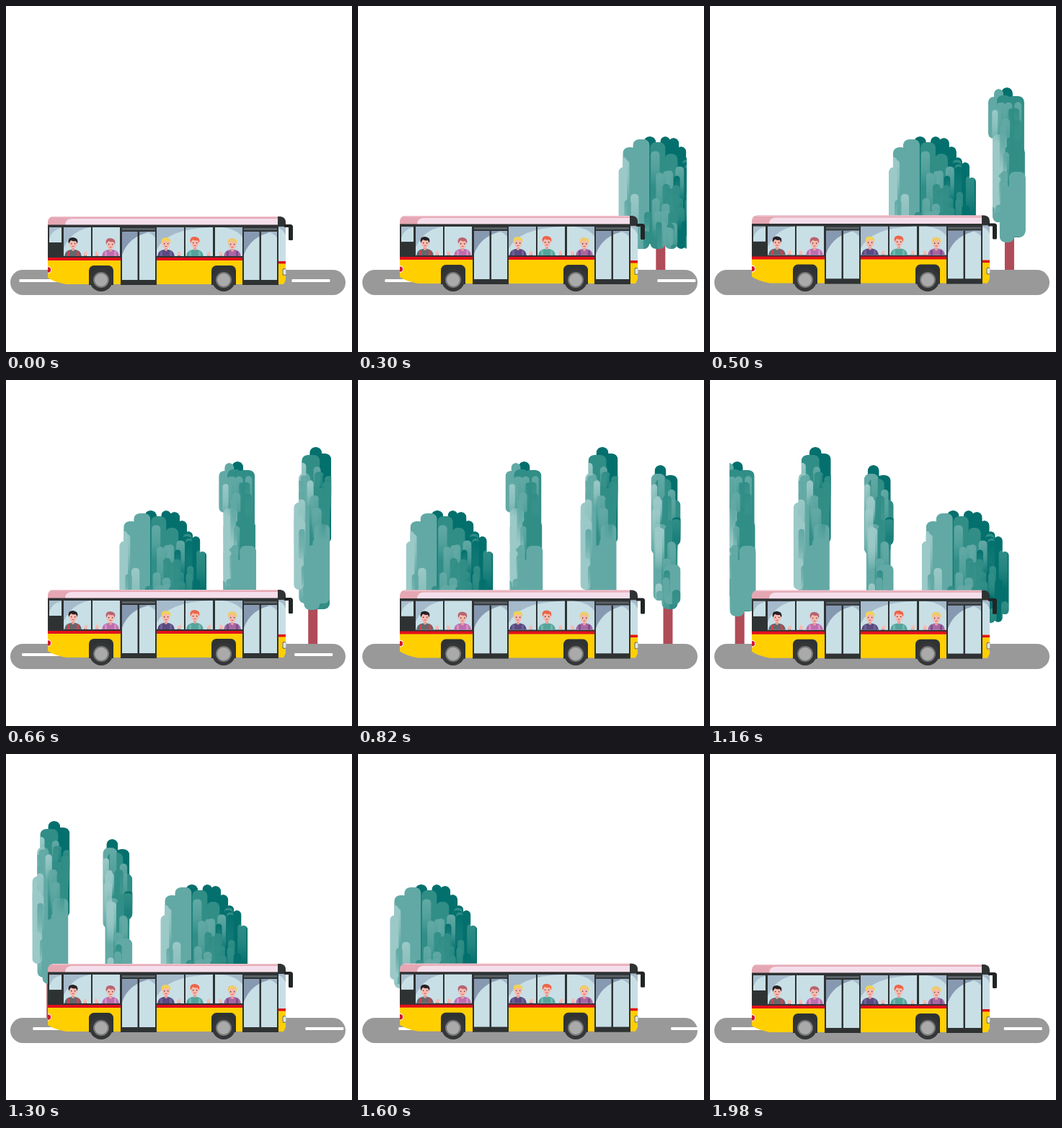
An HTML page with a canvas for the animation above (2000 ms loop, 480 px wide and 480 px high).

```html
<!DOCTYPE html>
<html lang="en">
<head>
<meta charset="utf-8">
<title>Bus ride</title>
<style>
html, body { margin: 0; width: 100%; height: 100%; overflow: hidden; background: #fff; }
canvas { display: block; }
</style>
</head>
<body>
<canvas id="stage" width="480" height="480"></canvas>
<script>
const g = document.getElementById('stage').getContext('2d');
const LOOP = 2000, SPEED = 0.567, DASH_GAP = 189;
const DARK = '#2f3233', YELLOW = '#ffcf00', RED = '#e3101c', SKIN = '#f8b9ad';
const SHADES = ['#9bc9c7', '#62a9a5', '#318e87', '#03706d'];

function box(x, y, w, h, color, r = 0) {
  g.fillStyle = color;
  g.beginPath();
  g.roundRect(x, y, w, h, r);
  g.fill();
}
function disc(x, y, r, color, ry = r) {
  g.fillStyle = color;
  g.beginPath();
  g.ellipse(x, y, r, ry, 0, 0, 7);
  g.fill();
}
function shape(d, color) {
  g.fillStyle = color;
  g.fill(new Path2D(d));
}
function within(path, draw) {
  g.save();
  g.clip(path);
  draw();
  g.restore();
}
function rectPath(x, y, w, h, r = 0) {
  const p = new Path2D();
  p.roundRect(x, y, w, h, r);
  return p;
}
function random(seed) {
  return () => (seed = seed * 16807 % 2147483647) / 2147483647;
}

// Crown columns: x, top, width, bottom, shade
const BUSH = [
  [35, 181, 17, 330, 3], [58, 181, 14, 330, 3], [69, 183, 15, 335, 3],
  [80, 195, 14, 337, 3], [90, 210, 12, 337, 3], [100, 217, 12, 336, 3],
  [110, 238, 11, 325, 3], [20, 185, 23, 337, 1], [6, 196, 20, 325, 1],
  [0, 224, 12, 313, 0], [44, 189, 21, 337, 2], [64, 205, 18, 337, 2]
];
const POPLAR = [
  [18, 113, 16, 200, 3], [26, 125, 24, 235, 2], [8, 115, 13, 200, 1],
  [0, 126, 14, 184, 1], [12, 124, 20, 300, 2], [6, 178, 20, 300, 0],
  [26, 195, 25, 321, 2], [29, 230, 23, 320, 1], [16, 250, 20, 328, 1]
];
const TALL = [
  [22, 93, 17, 180, 3], [26, 102, 26, 227, 3], [11, 104, 25, 300, 2],
  [7, 129, 16, 310, 1], [0, 170, 14, 291, 0], [22, 150, 28, 318, 2],
  [28, 200, 22, 310, 1], [14, 230, 22, 319, 1]
];
const SLIM = [
  [5, 118, 16, 190, 3], [17, 132, 20, 240, 3], [0, 130, 20, 242, 1],
  [6, 137, 22, 300, 2], [18, 166, 23, 230, 2], [3, 200, 20, 306, 1],
  [15, 210, 22, 318, 2], [18, 256, 23, 311, 1]
];

function makeTree(x, cols, trunk, seed) {
  const rnd = random(seed), outline = new Path2D(), streaks = [];
  const width = Math.max(...cols.map(c => c[0] + c[2]));
  const top = Math.min(...cols.map(c => c[1]));
  for (const [cx, y, w, end] of cols) outline.roundRect(cx, y, w, end - y, Math.min(w / 2, 8));
  for (let i = 0; i < width * 0.5; i++) {
    const sx = rnd() * (width - 8);
    const shade = Math.max(0, Math.min(3, Math.round(sx / width * 2.5 + rnd() * 1.5 - 0.5)));
    streaks.push([sx, top + 15 + rnd() * 165, 8 + rnd() * 5, 30 + rnd() * 35, shade]);
  }
  streaks.sort((a, b) => a[1] - b[1]);
  return { x, cols, trunk, outline, streaks };
}
const trees = [
  makeTree(532, BUSH, 52, 71), makeTree(670, POPLAR, 23, 29),
  makeTree(774, TALL, 20, 43), makeTree(872, SLIM, 17, 57),
  makeTree(952, BUSH, 52, 71)
];

function drawTree(tree, t) {
  const x = tree.x - SPEED * t;
  if (x > 460 || x < -130) return;
  g.save();
  g.translate(x, 0);
  box(tree.trunk, 300, 13, 67, '#b04b58');
  within(tree.outline, () => {
    for (const [cx, y, w, end, shade] of tree.cols)
      box(cx, y, w, end - y, SHADES[shade], Math.min(w / 2, 8));
    for (const [sx, y, w, h, shade] of tree.streaks) {
      const fade = g.createLinearGradient(0, y, 0, y + h);
      fade.addColorStop(0, SHADES[shade]);
      fade.addColorStop(0.5, SHADES[shade] + 'b0');
      fade.addColorStop(1, SHADES[shade] + '00');
      box(sx, y, w, h, fade, 5);
    }
  });
  g.restore();
}

function drawRoad(t) {
  box(6, 366, 465, 35, '#999', 17.5);
  const shift = (SPEED * t) % DASH_GAP;
  for (let x = 19 - shift; x < 480; x += DASH_GAP) box(x, 379, 53, 4, '#fff', 1);
}

// x, head y, hair, shirt, accent, hand x
const riders = [
  [93, 330, '#262126', '#66666c', '#c74650', 110],
  [145, 331, '#b86470', '#bd6eae', '#d98bc4', 126],
  [222, 330, '#f0d256', '#594b80', '#70609a', 240],
  [262, 329, '#ed6447', '#55a49c', '#70b9b0', 281],
  [314, 331, '#efcb6b', '#a966a3', '#75528d', 298]
];
function drawRider([x, y, hair, shirt, accent, hand], t) {
  const side = Math.sign(hand - x);
  shape(`M${x - 12} 349Q${x - 12} 339 ${x - 3} 338H${x + 3}Q${x + 12} 339 ${x + 12} 349Z`, shirt);
  box(x - 8, 340, 3, 8, accent, 1);
  box(x + 5, 340, 3, 8, accent, 1);
  box(x - 2, y + 4, 4, 6, '#eaa095', 2);
  disc(x, y - 3, 6.2, hair, 5);
  disc(x, y, 5.3, SKIN, 6.2);
  shape(`M${x - 6} ${y - 1}Q${x - 8} ${y - 9} ${x} ${y - 9}Q${x + 8} ${y - 8} ${x + 6} ${y - 1}L${x + 4} ${y - 4}Q${x} ${y - 3} ${x - 3} ${y - 5}Z`, hair);
  box(x - 3, y - 1, 1.3, 1.3, '#443338');
  box(x + 2, y - 1, 1.3, 1.3, '#443338');
  box(x - 1.5, y + 3, 3, 1, '#c85b64');
  g.save();
  g.translate(hand, 349);
  g.rotate(0.12 * Math.sin(t * Math.PI / 250));
  box(-2, -4, 4, 5, shirt, 1);
  disc(0, -5, 2.2, SKIN, 2.8);
  box(side * 1.4 - 0.6, -9, 1.2, 4, SKIN, 0.6);
  g.restore();
}

function drawDoor(x) {
  box(x, 306, 50, 81, DARK);
  box(x + 2, 308, 46, 3, '#596268');
  within(rectPath(x + 2, 313, 46, 67), () => {
    box(x + 2, 313, 46, 67, '#c8dfe6');
    shape(`M${x + 2} 313H${x + 44}Q${x + 12} 318 ${x + 2} 345Z`, '#8799b1');
    shape(`M${x + 33} 313H${x + 48}V321Q${x + 42} 314 ${x + 33} 313Z`, '#a5b9ca');
  });
  box(x + 23.5, 313, 2.5, 68, DARK);
}

function drawWheel(x) {
  disc(x, 380, 16, '#343637');
  disc(x, 380, 11, '#777');
  disc(x, 380, 9, '#aaa');
}

function drawBus(t) {
  g.save();
  g.translate(0, -0.7 * (1 - Math.cos(t * Math.PI / 500)));

  // Roof
  shape('M58 305V299Q59 292 66 292H379V305Z', '#e5a7b3');
  shape('M82 304Q82 295 92 295H379V304Z', '#f5deeb');
  box(64, 292, 314, 1.3, '#efc4cd');
  shape('M377 292H381Q388 293 388 300V305H377Z', DARK);

  // Lower body
  shape('M58 352H388V380L385 386H83Q67 383 58 377Z', YELLOW);
  box(58, 303.5, 330, 46, DARK);

  // Glass
  box(60, 307, 17, 21, '#a9bdcc');
  shape('M60 323Q64 310 77 308V328H60Z', '#c8dfe6');
  const panes = new Path2D();
  for (const x of [80, 120, 209, 249, 290]) panes.rect(x, 307, 38, 40);
  within(panes, () => {
    box(80, 307, 248, 40, '#a5bacb');
    shape('M80 336Q92 308 125 306H159V348H80Z', '#c8dfe6');
    shape('M209 338Q223 309 284 307H300Q323 310 330 324V348H209Z', '#c8dfe6');
    riders.forEach(r => drawRider(r, t));
  });

  // Stripe, wheel arches and doors
  box(58, 349, 270, 4, RED);
  for (const x of [115, 285]) box(x, 360, 34, 27, DARK, [7, 7, 0, 0]);
  drawDoor(159);
  drawDoor(328);

  // Front
  box(378, 306, 10, 48, '#c8dfe6');
  shape('M378 306H388V318Q384 309 378 308Z', '#a5bacb');
  box(378, 354, 10, 3.5, RED);
  box(383.5, 364, 5, 10, '#777', 2);
  box(384.5, 365, 4, 8, '#dce6e9', 2);

  // Tail light
  within(rectPath(58, 355, 10, 22), () => {
    disc(58, 366, 5, '#fff');
    disc(58.5, 366, 3.7, '#d51926');
  });

  // Mirror
  g.strokeStyle = '#222526';
  g.lineWidth = 4;
  g.lineJoin = 'round';
  g.stroke(new Path2D('M386 305H395V309'));
  box(392, 304, 6, 21, '#222526', 1.5);
  g.restore();

  drawWheel(132);
  drawWheel(302);
}

function frame(now) {
  const t = now % LOOP;
  box(0, 0, 480, 480, '#fff');
  drawRoad(t);
  within(rectPath(27, 0, 429, 366), () => trees.forEach(tree => drawTree(tree, t)));
  drawBus(t);
  requestAnimationFrame(frame);
}
requestAnimationFrame(frame);
</script>
</body>
</html>
```
